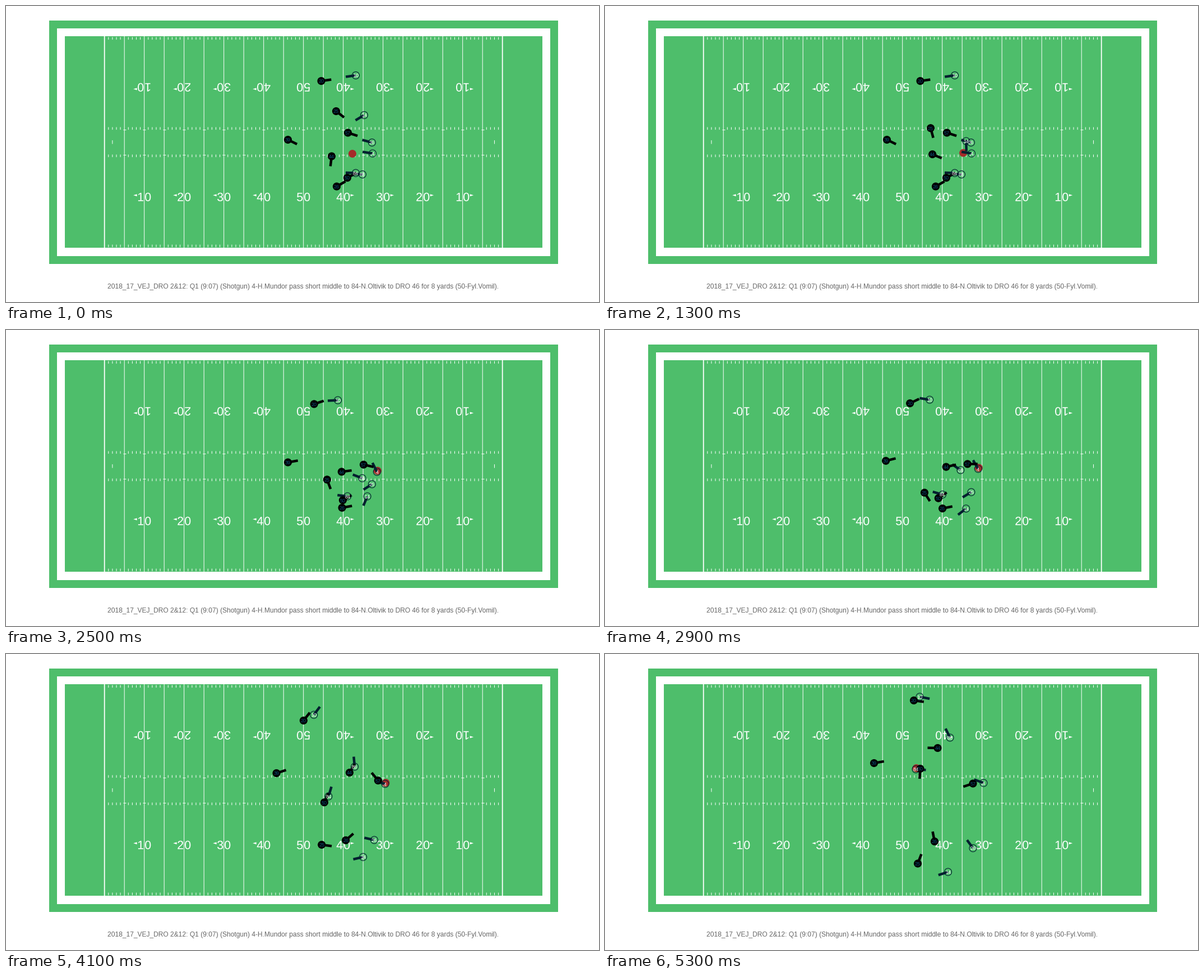
Animation of 1058x529 px, one loop 5400 ms. Source, as a matplotlib script:

```python
import numpy as np
import matplotlib.pyplot as plt
from matplotlib.animation import FuncAnimation
from matplotlib.patches import Circle, PathPatch, Polygon, Rectangle
from matplotlib.textpath import TextPath
from matplotlib.transforms import Affine2D

W, H, DPI = 1058, 529, 64
PT = 72 / DPI                      # points per pixel
FRAMES, INTERVAL = 54, 100
LAST = FRAMES - 1

YARD = 7.1
MID_X, MID_Y = 530.7, 243.3
TOP, BOTTOM = 54, 432
GREEN, NAVY, TEAL = "#4ebe6b", "#03202f", "#0c4f78"
RADIUS, BAR = 6.5, 18

SNAP, CAUGHT, THROWN, RECEIVED = 9, 16, 43, 50
PLAY_START = 13
CAPTION = ("2018_17_VEJ_DRO 2&12: Q1 (9:07) (Shotgun) 4-H.Mundor pass short middle "
           "to 84-N.Oltivik to DRO 46 for 8 yards (50-Fyl.Vomil).")

plt.rcParams["font.family"] = "Liberation Sans"
fig = plt.figure(figsize=(W / DPI, H / DPI), dpi=DPI, facecolor="white")
ax = fig.add_axes([0, 0, 1, 1])
ax.set(xlim=(0, W), ylim=(H, 0))
ax.axis("off")


def yard_x(yard):
    return MID_X + YARD * (np.asarray(yard) - 50)


def label(x, baseline, text, size, color, zorder=1):
    return ax.text(x, baseline, text, fontsize=size * PT, color=color,
                   ha="center", va="baseline", zorder=zorder)


def box(x0, y0, x1, y1, color):
    ax.add_patch(Rectangle((x0, y0), x1 - x0, y1 - y0, facecolor=color, lw=0))


def strokes(xs, y0, y1, width=1.0):
    ax.vlines(xs, y0, y1, color="white", lw=width * PT, zorder=1, snap=False)


def yard_number(yard, flip):
    """Two spaced digits and an arrow; flip=-1 turns them upside down."""
    x, size, spacing = yard_x(yard), 21.5, 13
    for i, digit in enumerate(str(min(yard, 100 - yard))):
        place = (Affine2D().translate((i - 0.5) * spacing - 0.278 * size, 0)
                 .scale(flip, -flip).translate(x, MID_Y + flip * 105.4))
        ax.add_patch(PathPatch(TextPath((0, 0), digit, size=size).transformed(place),
                               color="white", lw=0))
    side = np.sign(yard - 50)
    if side:
        y = MID_Y + flip * 94.9
        ax.add_patch(Polygon([(x + side * 13, y - 2), (x + side * 19.5, y),
                              (x + side * 13, y + 2)], color="white", lw=0))


def draw_field():
    box(77, 26, 985, 461, GREEN)
    box(91, 40, 971, 447, "white")
    box(105, TOP, 957, BOTTOM, GREEN)

    strokes(yard_x(np.arange(5, 100, 5)), TOP, BOTTOM)
    strokes(yard_x([0, 100]), TOP, BOTTOM, 1.8)
    strokes(yard_x([2, 98]), 240, 246.5)
    ticks = yard_x([y for y in range(1, 100) if y % 5])
    for y in (55.5, 216.5, 265.5, 426.5):
        strokes(ticks, y, y + 4.6)
    crosses = yard_x(np.arange(5, 100, 5))
    for y in (220.7, 265.7):
        ax.hlines([y] * len(crosses), crosses - 2.5, crosses + 2.5,
                  color="white", lw=PT, zorder=1)

    for yard in range(10, 100, 10):
        yard_number(yard, 1)
        yard_number(yard, -1)
    label(530.5, 505, CAPTION, 12, "#666666")


def glide(points, start):
    """Monotone cubic through evenly timed points, held until start."""
    p = np.array(points, float)
    h = (LAST - start) / (len(p) - 1)
    slope = np.diff(p, axis=0) / h
    before, after = slope[:-1], slope[1:]
    same_way = before * after > 0
    inner = np.where(same_way, 2 * before * after
                     / np.where(same_way, before + after, 1), 0)
    first = slope[:1] * (start == 0)      # late starters leave from rest
    m = np.vstack([first, inner, slope[-1:]])

    s = np.clip((np.arange(FRAMES) - start) / h, 0, len(p) - 1)
    i = np.minimum(s.astype(int), len(p) - 2)
    u = (s - i)[:, None]
    return ((1 + 2 * u) * (1 - u) ** 2 * p[i] + u * (1 - u) ** 2 * h * m[i]
            + u * u * (3 - 2 * u) * p[i + 1] + u * u * (u - 1) * h * m[i + 1])


class Player:
    """Numbered disc with a bar that shows where the player faces."""

    def __init__(self, number, points, start, ink, fill, text_color):
        self.path = glide(points, start)
        self.bar, = ax.plot([], [], color=ink, lw=4.5 * PT,
                            solid_capstyle="butt", zorder=3)
        self.disc = ax.add_patch(Circle((0, 0), RADIUS, facecolor=fill,
                                        edgecolor=ink, lw=1.1 * PT, zorder=4))
        self.text = label(0, 0, number, 9, text_color, zorder=5)

    def move(self, frame):
        x, y, heading = self.path[frame]
        a = np.radians(heading)
        self.bar.set_data([x, x + BAR * np.cos(a)], [y, y - BAR * np.sin(a)])
        self.disc.center = x, y
        self.text.set_position((x, y + 3.4))


def defender(number, *points, start=PLAY_START):
    return Player(number, points, start, "black", "black", TEAL)


def attacker(number, *points, start=PLAY_START):
    return Player(number, points, start, NAVY, "none", "white")


def ball_position(frame):
    """Snapped to the passer, carried, thrown, then carried by the receiver."""
    held = np.array([1, -2])
    passer_xy = passer.path[frame, :2] + held
    receiver_xy = receiver.path[frame, :2] + held
    if frame < THROWN:
        u = np.clip((frame - SNAP) / (CAUGHT - SNAP), 0, 1)
        return (1 - u) * np.array([618, 264]) + u * passer_xy
    u = min((frame - THROWN) / (RECEIVED - THROWN), 1)
    return (1 - u) * passer_xy + u * receiver_xy


draw_field()

# Key poses along each route: x, y, heading in degrees.
passer = attacker("4", (654, 263.5, 171), (663, 252, 115), (676.5, 232.5, 165),
                  (675.5, 230.5, 160))
receiver = attacker("84", (624, 298.5, 178), (607, 297, 172), (578, 259, 82),
                    (554.5, 206, -4))
players = [
    passer, receiver,
    attacker("10", (624, 124, 188), (588, 125.5, 182), (549, 111, 62), (561.5, 76.5, -11)),
    attacker("14", (639, 195, 211), (645, 260, 280), (643, 347, 192), (612, 389.5, 198),
             start=0),
    attacker("26", (653, 244, 165), (653, 280, 214), (657, 330, 172), (656.5, 347, 126)),
    attacker("88", (636, 301, 176), (635.5, 260, 156), (623, 207, 95), (615.5, 149.5, 116)),
    defender("20", (562.5, 134, 8), (548, 132, 20), (530.5, 121, 53), (551, 83, -8)),
    defender("25", (589, 188, -38), (578, 232, -80), (566, 322, -35), (558, 374.5, 69),
             start=0),
    defender("57", (610, 226.5, -18), (641, 241, -12), (664, 226, 120), (656.5, 231.5, 198)),
    defender("39", (503, 239, -26), (503, 236, 12), (483, 215, 18), (480, 195, 10)),
    defender("44", (581, 268.5, -97), (586, 263, -5), (617, 229, 25), (593.5, 168, 179),
             start=0),
    defender("50", (609, 307, 28), (599.5, 303.5, 30), (569, 270, 70), (562.5, 205, -94)),
    defender("26", (590, 322.5, 30), (600.5, 317.5, 10), (606.5, 332.5, 37), (588, 335, 101)),
]
ball = ax.add_patch(Circle((0, 0), 7, color="brown", lw=0, zorder=2))


def update(frame):
    for player in players:
        player.move(frame)
    ball.center = tuple(ball_position(frame))
    return []


animation = FuncAnimation(fig, update, frames=FRAMES, interval=INTERVAL,
                          repeat=True, repeat_delay=0, blit=False)
plt.show()
```
